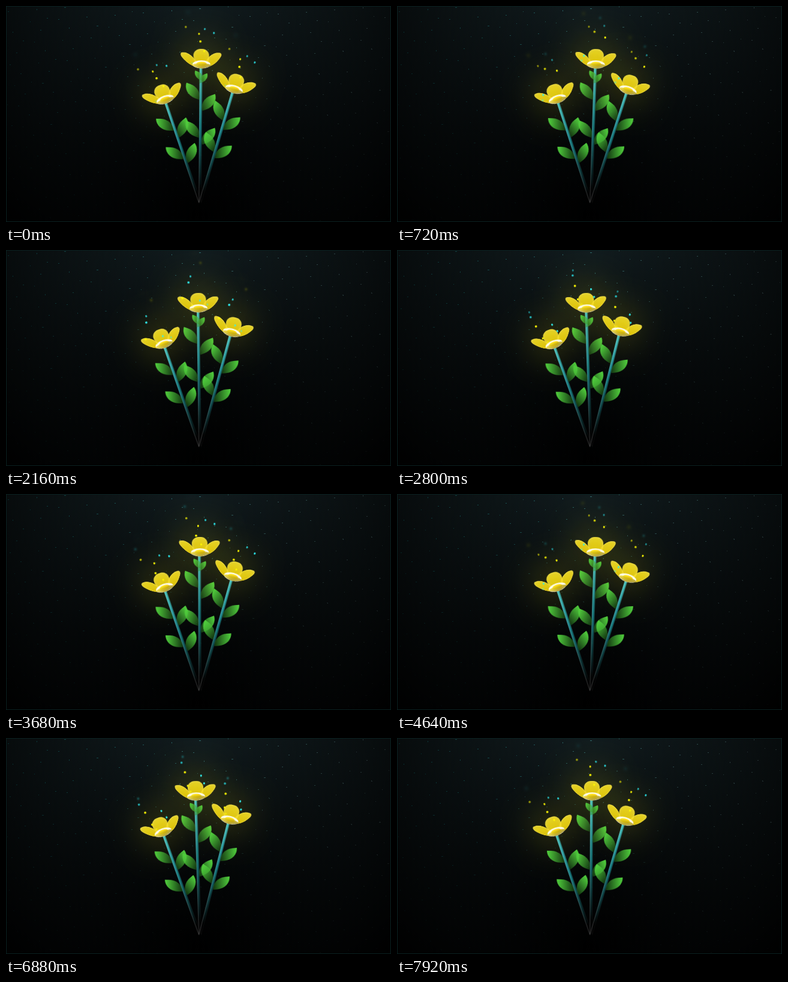
An HTML page that plays this animation: 642 by 362 pixels, repeating every 8 s.

```html
<!DOCTYPE html>
<html lang="en">
<head>
<meta charset="utf-8">
<title>Night flowers</title>
<style>
  :root { --u: 3.62px; --lead: -7.22s; }
  html, body { margin: 0; width: 100%; height: 100%; overflow: hidden; background: #000; }
  *, ::before, ::after { box-sizing: border-box; }
  .stage { position: relative; width: 642px; height: 362px; overflow: hidden; }
  .night {
    position: absolute; inset: 0; filter: blur(.35px);
    background-image:
      radial-gradient(ellipse at top, transparent, #000),
      radial-gradient(ellipse at bottom, #000, rgb(145 233 255 / .17)),
      repeating-linear-gradient(220deg, #000 0 9.5px, transparent 9.5px 11px),
      repeating-linear-gradient(189deg, #000 0 9.5px, transparent 9.5px 11px),
      repeating-linear-gradient(148deg, #000 0 9.5px, transparent 9.5px 11px),
      linear-gradient(90deg, #008a88, #6f8888);
  }
  .edge { position: absolute; inset: 0; border: 1px solid #0a2020; }
  .flowers { position: absolute; left: 321px; top: 362px; width: 0; height: 0; transform: scale(.9); }

  .flower {
    position: absolute; left: 0; bottom: calc(10 * var(--u)); z-index: 1;
    transform-origin: bottom center;
    animation: 4s linear var(--lead) infinite;
  }
  .flower1 { --len: 70; animation-name: sway1; }
  .flower2 { --len: 60; animation-name: sway2; }
  .flower3 { --len: 55; animation-name: sway3; }
  @keyframes sway1 { 0%, 100% { transform: rotate(2deg); } 50% { transform: rotate(-2deg); } }
  @keyframes sway2 { 0%, 100% { transform: rotate(18deg); } 50% { transform: rotate(14deg); } }
  @keyframes sway3 {
    0%, 100% { transform: rotate(-18deg) rotateY(0deg); }
    50% { transform: rotate(-20deg) rotateY(-10deg); }
  }

  .stem {
    width: calc(1.5 * var(--u)); height: calc(var(--len) * var(--u));
    background-image:
      linear-gradient(to left, rgb(0 0 0 / .2), transparent, rgb(255 255 255 / .2)),
      linear-gradient(to top, transparent 10%, #14757a, #39c6d6);
    box-shadow: inset 0 0 2px rgb(0 0 0 / .5);
  }
  .leaf {
    --h: calc(9 * var(--u));
    position: absolute; left: 90%; width: calc(7 * var(--u)); height: var(--h);
    border-radius: 0 var(--h) 0 var(--h);
    background-image: linear-gradient(to top, rgb(36 117 30 / .4), #52d23e);
    transform: rotate(70deg) rotateY(30deg);
  }
  .leaf1 { top: 20%; }
  .leaf2 { top: 45%; }
  .leaf3, .leaf4, .leaf6 {
    left: -460%; top: 12%; border-radius: var(--h) 0 var(--h) 0;
    transform: rotate(-70deg) rotateY(30deg);
  }
  .leaf4 { top: 40%; }
  .leaf5 { top: 0; transform-origin: left; transform: rotate(70deg) rotateY(30deg) scale(.6); }
  .leaf6 { top: -2%; left: -450%; transform-origin: right; transform: rotate(-70deg) rotateY(30deg) scale(.6); }

  .head { position: relative; }
  .head::after {
    content: ""; position: absolute; left: 0; top: 0;
    width: calc(8 * var(--u)); height: calc(8 * var(--u));
    transform: translate(-50%, -100%);
    background: #f3e51a; filter: blur(calc(10 * var(--u)));
  }
  .petal {
    position: absolute; left: 50%; bottom: 0;
    width: calc(8 * var(--u)); height: calc(11 * var(--u));
    border-radius: 51% 49% 47% 53% / 44% 45% 55% 69%;
    background-image: linear-gradient(to top, #f0d000, #fee727);
    box-shadow: inset 0 0 calc(2 * var(--u)) rgb(255 255 255 / .3);
    transform-origin: bottom center; opacity: .9;
  }
  .petal1 { transform: translate(-10%, 1%) rotateY(40deg) rotateX(-50deg); }
  .petal2 { transform: translate(-50%, -4%) rotateX(40deg); }
  .petal3 { transform: translate(-90%, 0) rotateY(45deg) rotateX(50deg); }
  .petal4 {
    height: calc(8 * var(--u)); z-index: 1; opacity: .8;
    border-radius: calc(4 * var(--u)) calc(10 * var(--u)) calc(4 * var(--u)) calc(4 * var(--u));
    background-image: linear-gradient(to top, #9a8200, #ecd21c);
    transform-origin: bottom left;
    transform: translate(0, 18%) rotateX(70deg) rotate(-43deg);
  }
  .core {
    position: absolute; left: calc(-3.5 * var(--u)); top: calc(-3 * var(--u));
    width: calc(9 * var(--u)); height: calc(4 * var(--u));
    border-radius: 50%; background: #fff;
  }
  .core::after {
    content: ""; position: absolute; left: 50%; top: 45%; width: 60%; height: 60%;
    transform: translate(-50%, -50%); border-radius: inherit;
    background-image: linear-gradient(90deg, #ffeb12, #ffce00);
  }

  .spark {
    position: absolute; bottom: 0; left: calc(var(--x) * var(--u));
    width: var(--u); height: var(--u); border-radius: 50%;
    filter: blur(calc(.2 * var(--u)));
    animation: rise 4s linear calc(var(--d) * 1s + var(--lead)) infinite;
  }
  @keyframes rise {
    0% { opacity: 0; transform: translate(0, 0); }
    25% { opacity: 1; transform: translate(calc(-2 * var(--u)), calc(-5 * var(--u))); }
    50% { opacity: 1; transform: translate(calc(2 * var(--u)), calc(-15 * var(--u))); filter: blur(calc(.2 * var(--u))); }
    75% { transform: translate(calc(-2 * var(--u)), calc(-20 * var(--u))); filter: blur(calc(.2 * var(--u))); }
    100% { opacity: 0; transform: translate(0, calc(-30 * var(--u))); filter: blur(var(--u)); }
  }
</style>
</head>
<body>
<div class="stage">
  <div class="night"></div>
  <div class="edge"></div>
  <div class="flowers"></div>
</div>
<script>
  // Each spark: horizontal offset, delay in seconds
  const sparks = [[-2, 1], [3, .5], [-6, .3], [6, .9], [-1, 1.5], [-4, 3], [3, 2], [-6, 3.5]];
  const leafCounts = [6, 4, 4];

  function add(parent, className) {
    const el = document.createElement('div');
    el.className = className;
    return parent.appendChild(el);
  }

  function addFlower(parent, leafCount, index) {
    const flower = add(parent, `flower flower${index + 1}`);
    const head = add(flower, 'head');
    for (let i = 1; i <= 4; i++) add(head, `petal petal${i}`);
    add(head, 'core');
    sparks.forEach(([x, delay], i) => {
      const spark = add(head, 'spark');
      spark.style.setProperty('--x', x);
      spark.style.setProperty('--d', delay);
      spark.style.background = i % 2 ? '#23f0ff' : '#fffb00';
    });
    const stem = add(flower, 'stem');
    for (let i = 1; i <= leafCount; i++) add(stem, `leaf leaf${i}`);
  }

  const bed = document.querySelector('.flowers');
  leafCounts.forEach((count, i) => addFlower(bed, count, i));
</script>
</body>
</html>
```
